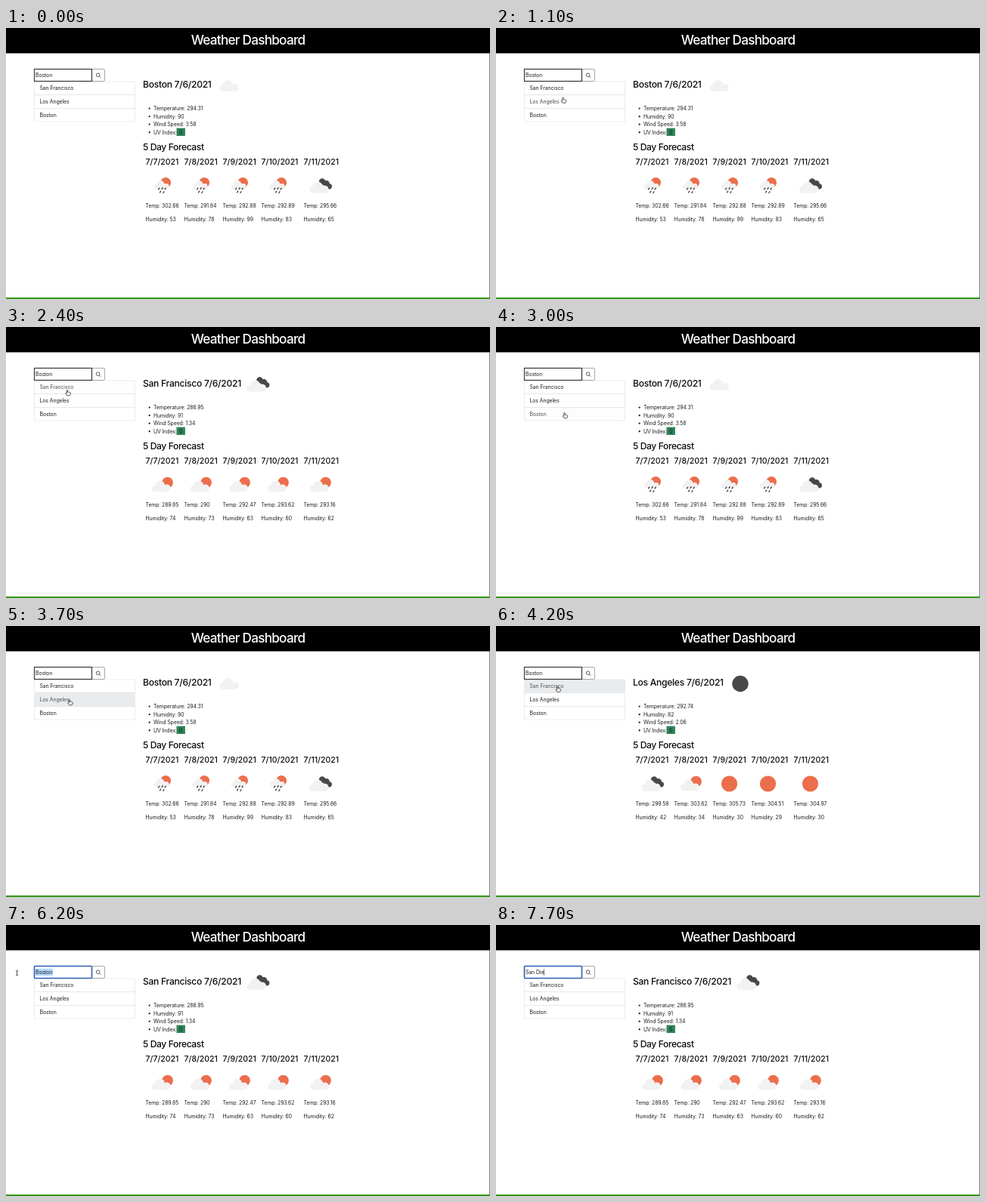
Recreate the animation shown at these times as an HTML page. Size 640 by 359 pixels, loop 8000 ms.

```html
<!DOCTYPE html>
<html lang="en">
<head>
<meta charset="utf-8">
<title>Weather Dashboard</title>
<style>
  html, body { margin: 0; width: 100%; height: 100%; overflow: hidden; background: #fff; }
  svg { display: block; width: 100vw; height: 100vh; }
  text { font: 6.9px Inter, "Open Sans", sans-serif; font-optical-sizing: none; letter-spacing: -.013em; fill: #1b1e21; white-space: pre; }
  .title { font-size: 17.2px; font-weight: 500; letter-spacing: -.044em; fill: #fff; text-anchor: middle; }
  .head { font-size: 12.1px; font-weight: 500; letter-spacing: -.023em; fill: #0c0c0c; }
  .sub { letter-spacing: -.033em; }
  .day { font-size: 10.5px; font-weight: 500; letter-spacing: 0; fill: #0c0c0c; }
</style>
</head>
<body>
<svg id="stage" viewBox="0 0 640 359" preserveAspectRatio="none"></svg>
<script>
const LOOP = 8000;
const SUN = '#ec6e4c', DARK = '#48484a', PALE = '#f2f2f2';
const DAY_X = [184.5, 235.5, 286.5, 337.5, 393.5];
const ROW_Y = [71, 88.5, 106.5, 124];
const NAMES = ['San Francisco', 'Los Angeles', 'Boston'];

const cities = [
  { icon: ['broken', 333, 76], now: ['286.95', 91, '1.34'], days: Array(5).fill('few'),
    temp: ['289.85', '290', '292.47', '293.62', '293.16'], hum: [74, 73, 63, 60, 62] },
  { icon: ['night', 323, 76.5], now: ['292.74', 82, '2.06'], days: ['broken', 'few', 'clear', 'clear', 'clear'],
    temp: ['299.58', '303.62', '305.73', '304.51', '304.97'], hum: [42, 34, 30, 29, 30] },
  { icon: ['cloud', 295, 76.5], now: ['294.31', 90, '3.58'], days: ['rain', 'rain', 'rain', 'rain', 'broken'],
    temp: ['302.66', '291.84', '292.88', '292.89', '295.66'], hum: [53, 78, 99, 83, 65] }
];

// [time, city]: each click is pressed one step before the results change
const clicks = [[1600, 1], [2300, 0], [3000, 2], [3800, 1], [4300, 0]];

// [time, x, y] of the pointer's hot spot
const path = [
  [200, 333, 352], [500, 205, 215], [800, 112, 132], [1000, 89, 104], [1200, 88, 80], [1300, 86, 58],
  [1500, 83.5, 97.5], [1900, 83.5, 97.5], [2200, 81, 83.5], [2700, 81, 83.5], [2900, 90.5, 113.5],
  [3300, 90.5, 113.5], [3500, 85, 98], [3900, 83, 97], [4200, 81.3, 80], [4400, 81.3, 80],
  [5000, 70, 66], [5300, 69, 63.5], [5600, 63, 63.5], [6000, 9, 63.5], [6200, 14.5, 63.5], [6600, 14.5, 63.5]
];

const typed = [[6600, 'S'], [6700, 'Sa'], [6800, 'San'], [6900, 'San '], [7300, 'San D'], [7600, 'San Di'], [7700, 'San Die']];

const text = (x, y, s, cls = '') => `<text x="${x}" y="${y}" class="${cls}">${s}</text>`;
const rect = (x, y, w, h, fill, more = '') => `<rect x="${x}" y="${y}" width="${w}" height="${h}" fill="${fill}" ${more}/>`;
const disc = (x, y, r, fill) => `<circle cx="${x}" cy="${y}" r="${r}" fill="${fill}"/>`;
const move = (x, y, s, k = 1) => `<g transform="translate(${x} ${y}) scale(${k})">${s}</g>`;

const cloud = disc(-8, 3, 4.5, PALE) + disc(-1.5, -1, 6.6, PALE) + disc(8, 2.5, 5, PALE) + rect(-8, 1, 16, 6.5, PALE);
const drops = [[-4.5, 4], [0, 3.5], [4, 4], [-2.5, 8], [1.8, 8.6]]
  .map(([x, y]) => `<path d="M${x + .6} ${y - .9}l-1.1 1.8" stroke="#3b3b3d" stroke-width="1.3" stroke-linecap="round"/>`).join('');

const icons = {
  cloud,
  clear: disc(0, 0, 10.6, SUN),
  night: disc(0, 0, 10.7, DARK),
  few: disc(7, -3, 7.3, SUN) + move(-1.5, 2, cloud, .97),
  broken: disc(2.5, -5.5, 4.2, DARK) + disc(8, -2.8, 4.3, DARK) + disc(11.8, .8, 3.6, DARK) + move(-2, 2.2, cloud),
  rain: disc(4.6, -4.2, 6.9, SUN) + move(-1.2, -1, cloud, .78) + drops
};

function cityView(c, i) {
  const [kind, x, y] = c.icon;
  let s = text(181, 79.2, NAMES[i] + ' 7/6/2021', 'head') + move(x, y, icons[kind]);
  ['Temperature: ', 'Humidity: ', 'Wind Speed: '].forEach((label, n) => {
    s += text(195, 109 + n * 10.55, label + c.now[n]);
  });
  DAY_X.forEach((dx, n) => {
    s += text(dx, 181.2, `7/${7 + n}/2021`, 'day') + move(dx + 22.1, 209, icons[c.days[n]])
      + text(dx, 238.4, 'Temp: ' + c.temp[n]) + text(dx, 255.7, 'Humidity: ' + c.hum[n]);
  });
  return `<g class="city">${s}</g>`;
}

const pointers = {
  arrow: '<path d="M0 0v7.4l1.8-1.6 1.2 2.8 1.3-.6-1.2-2.7h2.4z" fill="#000" stroke="#fff" stroke-width=".6"/>',
  hand: '<path d="M-.7.4Q0-.5.7.4V2.8Q1.5 2.2 2 3Q2.7 2.5 3.2 3.4Q4.2 3.1 4.3 4.2Q4.4 6 3.3 7.2H-.4Q-1.2 5.8-2.4 4.4Q-1.8 3.5-.7 4.4Z" fill="#fff" stroke="#222" stroke-width=".75"/>',
  beam: '<path d="M-1.4-3.2Q0-3.2 0-2.4Q0-3.2 1.4-3.2M0-2.4V2.4M-1.4 3.2Q0 3.2 0 2.4Q0 3.2 1.4 3.2" fill="none" stroke="#222" stroke-width=".8"/>'
};

const stage = document.getElementById('stage');
stage.innerHTML =
  rect(0, 0, 640, 359, '#fff') + rect(0, 0, 640, 33.5, '#000') + text(320, 22, 'Weather Dashboard', 'title')
  + rect(639.2, 33, .8, 324, '#666') + rect(0, 357, 640, 2, '#35961a')
  + NAMES.map((n, i) => rect(37.5, ROW_Y[i], 133, ROW_Y[i + 1] - ROW_Y[i], '#fff', 'class="row" stroke="#dfdfdf" stroke-width=".6"')
      + `<text class="name" x="44.5" y="${82.4 + i * 17.8}">${n}</text>`).join('')
  + rect(113.5, 54.5, 17, 16, '#fff', 'stroke="#858585" stroke-width=".7" rx="1.4"')
  + '<g fill="none" stroke="#333" stroke-width=".8"><circle cx="121.6" cy="62.2" r="2.3"/><path d="M123.3 63.9l2 2"/></g>'
  + rect(37.5, 54.5, 76, 16, '#fff', 'id="field"') + rect(39, 57.8, 0, 9.4, '#b3d7ff', 'id="pick"')
  + '<text id="entry" x="39" y="65.2"></text>' + rect(0, 58.4, .6, 8.4, '#111', 'id="caret"')
  + [0, 1, 2, 3].map(n => disc(189.7, 106.6 + n * 10.55, 1.15, '#1b1e21')).join('')
  + text(195, 140.6, 'UV Index:') + rect(225.5, 132.6, 11.4, 10.4, '#2e8457') + text(229.1, 140.6, '0')
  + text(181, 161.5, '5 Day Forecast', 'head sub')
  + cities.map(cityView).join('')
  + '<g id="pointer"></g>';

const $ = id => document.getElementById(id);
const views = stage.querySelectorAll('.city'), rows = stage.querySelectorAll('.row'), names = stage.querySelectorAll('.name');
const field = $('field'), pick = $('pick'), entry = $('entry'), caret = $('caret'), pointer = $('pointer');
const latest = (list, t, first) => list.reduce((v, [at, next]) => t >= at ? next : v, first);

function pointAt(t) {
  const n = path.findIndex(p => p[0] > t);
  if (n < 1) return path[n ? path.length - 1 : 0].slice(1);
  const [t0, x0, y0] = path[n - 1], [t1, x1, y1] = path[n];
  const k = (t - t0) / (t1 - t0);
  return [x0 + (x1 - x0) * k, y0 + (y1 - y0) * k];
}

function hoverAt(t, y) {
  if (t < 1100 || t >= 5400) return -1;
  if (y < ROW_Y[0]) return t > 4300 ? 0 : -1;
  return y < ROW_Y[1] ? 0 : y < ROW_Y[2] ? 1 : 2;
}

function draw(t) {
  const [x, y] = pointAt(t);
  const city = latest(clicks, t, 2), hover = hoverAt(t, y), focus = t >= 5500;
  const pressed = clicks.some(([at]) => t === at - 100);
  views.forEach((v, i) => v.setAttribute('display', i === city ? 'inline' : 'none'));
  rows.forEach((r, i) => r.setAttribute('fill', i !== hover ? '#fff' : pressed ? '#e9ecef' : '#fdfdfd'));
  names.forEach((n, i) => n.style.fill = i === hover ? '#495057' : '#1b1e21');

  field.setAttribute('stroke', focus ? '#2c5fb5' : '#3a3a3a');
  field.setAttribute('stroke-width', focus ? 1.6 : 1.2);
  field.setAttribute('rx', focus ? 1 : 0);
  const value = latest(typed, t, 'Boston');
  if (entry.textContent !== value) entry.textContent = value;
  const from = Math.max(39, Math.min(62, x));
  pick.setAttribute('x', from);
  pick.setAttribute('width', t >= 5600 && t < 6600 ? 62 - from : 0);
  caret.setAttribute('x', 39 + entry.getComputedTextLength());
  caret.setAttribute('display', t >= 6600 ? 'inline' : 'none');

  const shape = t < 1000 ? 'arrow' : y < ROW_Y[0] ? 'beam' : 'hand';
  pointer.innerHTML = t >= 200 && t < 6600 ? move(x, y, pointers[shape]) : '';
}

function tick() {
  draw(Math.floor(performance.now() % LOOP / 100) * 100);
  requestAnimationFrame(tick);
}
tick();
</script>
</body>
</html>
```
